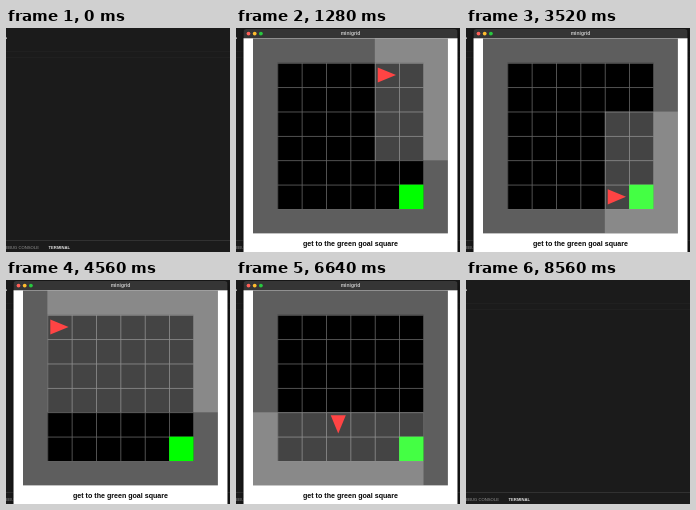
Write an HTML page with a canvas that moves like this. It is 224 by 224 pixels and loops after 8800 ms.

```html
<!DOCTYPE html>
<html lang="en">
<head>
<meta charset="utf-8">
<title>minigrid</title>
<style>
html, body { margin: 0; width: 100%; height: 100%; overflow: hidden; background: #1b1b1b; }
canvas { display: block; width: 224px; height: 224px; }
</style>
</head>
<body>
<canvas id="stage"></canvas>
<script>
const SIZE = 224, LOOP = 8800, OPEN = 160, CLOSE = 8480;
const FONT = '"Liberation Sans", Arial, sans-serif';
const GRID = { x: 17, y: 10.5, n: 8, cell: 24.36 };
const GOAL = { x: 6, y: 6 };
const STEPS = [[1, 0], [0, 1]]; // right, down

// F: forward, R: turn right, L: turn left, 0: reset
const ACTIONS = [
  [320, 'F'], [640, 'F'], [960, 'F'], [1280, 'F'], [1600, 'R'],
  [1920, 'F'], [2240, 'F'], [2640, 'F'], [2960, 'F'], [3280, 'F'],
  [3520, 'L'], [4000, 'F'], [4320, '0'],
  [4640, 'F'], [4960, 'F'], [5200, 'R'], [5520, 'F'], [5840, 'F'],
  [6160, 'F'], [6480, 'F'], [6800, 'F'], [7120, 'L'],
  [7440, 'F'], [7760, 'F'], [8080, 'F']
];

const canvas = document.getElementById('stage');
const ctx = canvas.getContext('2d');
const ratio = window.devicePixelRatio || 1;
canvas.width = canvas.height = Math.round(SIZE * ratio);
ctx.scale(ratio, ratio);

function rect(x, y, w, h, color) {
  ctx.fillStyle = color;
  ctx.fillRect(x, y, w, h);
}

function label(str, x, y, font, color, align) {
  ctx.font = font + ' ' + FONT;
  ctx.fillStyle = color;
  ctx.textAlign = align;
  ctx.textBaseline = 'alphabetic';
  ctx.fillText(str, x, y);
}

function agentAt(time) {
  let a = { x: 1, y: 1, dir: 0 };
  for (const [at, act] of ACTIONS) {
    if (at > time) break;
    if (act === 'F') {
      a.x += STEPS[a.dir][0];
      a.y += STEPS[a.dir][1];
    } else if (act === 'R') a.dir = 1;
    else if (act === 'L') a.dir = 0;
    else a = { x: 1, y: 1, dir: 0 };
  }
  return a;
}

function drawTerminal() {
  rect(0, 0, SIZE, SIZE, '#1b1b1b');
  rect(0, 23, SIZE, 0.6, '#242424');
  rect(0, 29, SIZE, 0.6, '#242424');
  rect(0, 212, SIZE, 0.8, '#383838');
  rect(0, 9.5, 1, 1.3, '#c8c8c8');
  label('DEBUG CONSOLE', 33, 221, '4.2px', '#969696', 'right');
  label('TERMINAL', 42.5, 221, 'bold 4.2px', '#e4e4e4', 'left');
}

function drawAgent(a) {
  const c = GRID.cell;
  ctx.save();
  ctx.translate(GRID.x + (a.x + 0.5) * c, GRID.y + (a.y + 0.5) * c);
  ctx.rotate(a.dir * Math.PI / 2);
  ctx.beginPath();
  ctx.moveTo(-0.38 * c, -0.31 * c);
  ctx.lineTo(0.37 * c, 0);
  ctx.lineTo(-0.38 * c, 0.31 * c);
  ctx.closePath();
  ctx.fillStyle = '#ff0000';
  ctx.fill();
  ctx.restore();
}

// The agent sees a 7 x 7 patch in front of it.
function drawView(a) {
  const c = GRID.cell, clamp = v => Math.max(0, Math.min(GRID.n, v));
  const left = a.dir === 0 ? a.x : a.x - 3;
  const top = a.dir === 0 ? a.y - 3 : a.y;
  const x0 = clamp(left), x1 = clamp(left + 7);
  const y0 = clamp(a.dir === 0 ? top : a.y), y1 = clamp(top + 7);
  rect(GRID.x + x0 * c, GRID.y + y0 * c, (x1 - x0) * c, (y1 - y0) * c, 'rgba(255,255,255,0.265)');
}

function drawGrid(a) {
  const { x, y, n, cell: c } = GRID, inner = (n - 2) * c;
  rect(x, y, n * c, n * c, '#5e5e5e');
  rect(x + c, y + c, inner, inner, '#000');
  for (let i = 1; i < n; i++) {
    rect(x + i * c, y + c, 0.8, inner, '#646464');
    rect(x + c, y + i * c, inner, 0.8, '#646464');
  }
  rect(x + GOAL.x * c, y + GOAL.y * c, c, c, '#00ff00');
  drawAgent(a);
  drawView(a);
}

function drawWindow(a) {
  ctx.save();
  ctx.shadowColor = 'rgba(0,0,0,0.8)';
  ctx.shadowBlur = 6 * ratio;
  rect(7.5, 3, 214, SIZE, '#000');
  ctx.restore();
  ctx.beginPath();
  ctx.moveTo(7.5, 11);
  ctx.lineTo(7.5, 4);
  ctx.quadraticCurveTo(7.5, 1, 10.5, 1);
  ctx.lineTo(218.5, 1);
  ctx.quadraticCurveTo(221.5, 1, 221.5, 4);
  ctx.lineTo(221.5, 11);
  ctx.closePath();
  ctx.fillStyle = '#353535';
  ctx.fill();
  rect(7.5, 10.3, 214, SIZE, '#fff');
  ['#ff5f57', '#febc2e', '#28c840'].forEach((color, i) => {
    ctx.beginPath();
    ctx.arc(12.5 + i * 6.2, 5.6, 1.9, 0, Math.PI * 2);
    ctx.fillStyle = color;
    ctx.fill();
  });
  label('minigrid', 114.5, 7.3, 'bold 5px', '#c4c4c4', 'center');
  drawGrid(a);
  label('get to the green goal square', 114.5, 217.6, 'bold 7.1px', '#000', 'center');
}

function render(now) {
  const time = now % LOOP;
  drawTerminal();
  if (time >= OPEN && time < CLOSE) drawWindow(agentAt(time));
  requestAnimationFrame(render);
}

const start = performance.now();
(function first() { render(0); })();
function frame() {}
</script>
</body>
</html>
```
